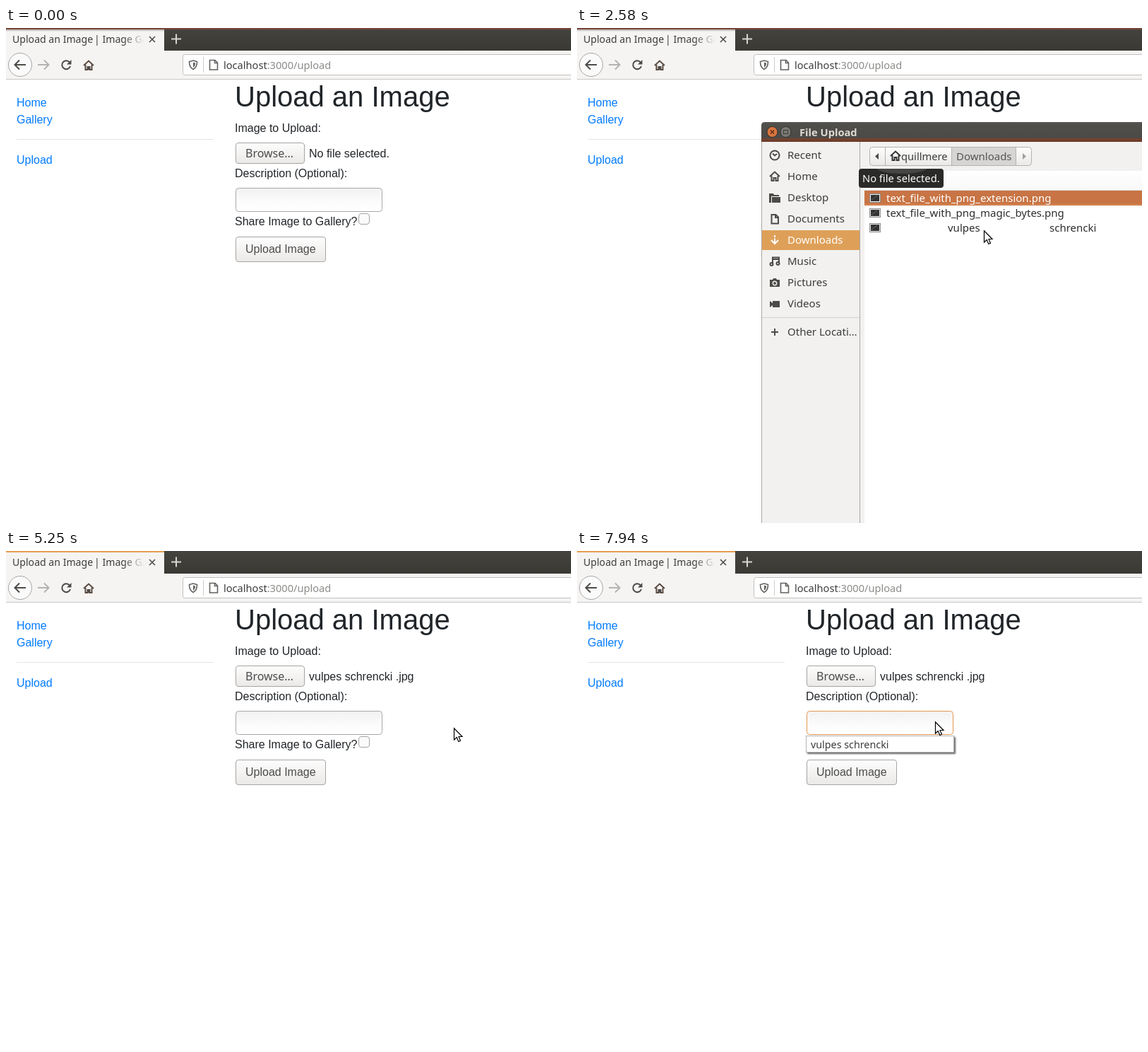
These frames come from a looping animation (800 px wide and 700 px high, 7.99 s). An HTML page:

```html
<!DOCTYPE html>
<html lang="en">
<head>
<meta charset="utf-8">
<title>Upload an Image</title>
<style>
  html, body { margin: 0; width: 100%; height: 100%; overflow: hidden; background: #fff; }
  svg { display: block; width: 800px; height: 700px; }
  text { white-space: pre; }
  .page { font: 16px "Liberation Sans", Arial, sans-serif; fill: #212529; }
  .ui { font: 15px "Noto Sans", "Open Sans", sans-serif; fill: #3c3c3c; }
  .link { fill: #007bff; }
  .icon { fill: none; stroke: #4c4b48; stroke-width: 2; }
  .solid { fill: #4c4b48; }
</style>
</head>
<body>
<svg viewBox="0 0 800 700" xmlns="http://www.w3.org/2000/svg">
  <defs>
    <linearGradient id="bar" x2="0" y2="1"><stop stop-color="#45433f"/><stop offset="1" stop-color="#3b3934"/></linearGradient>
    <linearGradient id="shade" x2="0" y2="1"><stop stop-color="#824633"/><stop offset=".3" stop-color="#74493c"/><stop offset=".45" stop-color="#55504c" stop-opacity=".4"/><stop offset="1" stop-color="#3b3934" stop-opacity="0"/></linearGradient>
    <linearGradient id="fade"><stop stop-color="#f5f4f2" stop-opacity="0"/><stop offset="1" stop-color="#f5f4f2"/></linearGradient>
    <linearGradient id="button" x2="0" y2="1"><stop stop-color="#fdfdfd"/><stop offset="1" stop-color="#ebe9e7"/></linearGradient>
    <linearGradient id="hover" x2="0" y2="1"><stop stop-color="#fff"/><stop offset="1" stop-color="#f0eeed"/></linearGradient>
    <linearGradient id="pressed" x2="0" y2="1"><stop stop-color="#d9d7d5"/><stop offset="1" stop-color="#e9e7e5"/></linearGradient>
    <linearGradient id="field" x2="0" y2="1"><stop stop-color="#f2f1f1"/><stop offset=".6" stop-color="#fcfcfc"/><stop offset="1" stop-color="#fff"/></linearGradient>
    <linearGradient id="header" x2="0" y2="1"><stop stop-color="#fff"/><stop offset="1" stop-color="#f8f8f8"/></linearGradient>
    <linearGradient id="title" x2="0" y2="1"><stop stop-color="#5a5856"/><stop offset=".1" stop-color="#504f4c"/><stop offset=".78" stop-color="#4b4a47"/><stop offset=".86" stop-color="#76432f"/><stop offset="1" stop-color="#673a29"/></linearGradient>
    <path id="house" d="M-7 0 0-6.5 7 0M-4.5-1V6H-1.5V2H1.5V6H4.5V-1"/>
  </defs>

  <!-- Browser frame -->
  <rect width="800" height="32" fill="url(#bar)"/>
  <rect width="224" height="32" fill="#f5f4f2"/>
  <rect y="32" width="800" height="40" fill="#f5f4f2"/>
  <path d="M0 72.5H800" stroke="#cac8c6"/>
  <rect id="tabLine" width="224" height="2" fill="#e79d51"/>
  <rect id="dimLine" width="800" height="5" fill="url(#shade)"/>
  <g class="ui">
    <text x="9" y="21" font-size="14.1" style="font-size:14.1px">Upload an Image</text>
    <text x="125" y="21" style="font-size:14.1px">| Image Ga</text>
    <rect x="166" y="5" width="30" height="24" fill="url(#fade)"/>
    <rect x="196" y="5" width="26" height="24" fill="#f5f4f2"/>
  </g>
  <path class="icon" d="M203 12l8 8M211 12l-8 8" style="stroke-width:1.6"/>
  <path d="M234 15.5H248M241 8.5V22.5" stroke="#d8d6d2" stroke-width="2"/>
  <circle cx="20" cy="52" r="16.5" fill="#fbfafa" stroke="#a8a6a4"/>
  <path class="icon" d="M28 52H13M19 45.5 12.5 52 19 58.5"/>
  <path class="icon" d="M45 52H60M54 45.5 60.5 52 54 58.5" style="stroke:#b5b3b1"/>
  <path class="icon" d="M90 48.5A6 6 0 1 0 91 54"/>
  <path class="solid" d="M92.500 45V51.500H86Z"/>
  <g transform="translate(117 53)"><use href="#house" class="icon" style="stroke:#5a4b42"/><path class="solid" d="M-1.500 1H1.500V6H-1.500Z"/></g>
  <rect x="250.500" y="37.500" width="560" height="29" rx="3" fill="#fff" stroke="#c3c1bf"/>
  <path class="icon" d="M265 46 270.500 47.500C270.500 53 269 56.500 265 58.500 261 56.500 259.500 53 259.500 47.500Z" style="stroke:#63625f;stroke-width:1.600"/>
  <path d="M265 48.500V56C267.500 54 268 52 268 49.500Z" fill="#63625f"/>
  <path d="M279.500 41V63" stroke="#cfcdcb"/>
  <path class="icon" d="M288.500 45.500H296L299.500 49V59H288.500ZM295.500 45.500V49.500H299.500" style="stroke:#63625f;stroke-width:1.600"/>
  <g class="ui">
    <text x="308" y="58" style="font-size:14.600px">localhost<tspan fill="#8c8b89">:3000/upload</tspan></text>
  </g>

  <!-- Page -->
  <g class="page">
    <text class="link" x="15" y="111">Home</text>
    <text class="link" x="15" y="135">Gallery</text>
    <path d="M15 157.500H294" stroke="#e5e5e5"/>
    <text class="link" x="15" y="192">Upload</text>
    <text x="324" y="111" style="font-size:40px">Upload an Image</text>
    <text x="324" y="147">Image to Upload:</text>
    <rect id="browse" x="325.500" y="162.500" width="97" height="29" rx="3.500"/>
    <text class="ui" x="339" y="183" style="font-size:16px;fill:#4c4c4c">Browse…</text>
    <text id="fileName" x="429" y="183"></text>
    <text x="324" y="211">Description (Optional):</text>
    <rect id="input" x="325.500" y="226.500" width="207" height="33" rx="4" fill="url(#field)"/>
    <rect id="caret" y="235" width="1" height="17" fill="#222"/>
    <text x="324" y="279">Share Image to Gallery?</text>
    <rect x="499.500" y="262.500" width="15" height="15" rx="3.500" fill="#fafafa" stroke="#a5a3a1"/>
    <rect x="325.500" y="295.500" width="127" height="35" rx="3.500" fill="url(#button)" stroke="#a7a5a2"/>
    <text x="339" y="318" style="fill:#4c4c4c">Upload Image</text>
  </g>

  <g id="suggest" style="filter:drop-shadow(2px 2px 1px #0009)">
    <rect x="324.500" y="261.500" width="209" height="23" fill="#fff" stroke="#b5b3b1"/>
    <rect id="suggestRow" x="326" y="262" width="206" height="22" fill="#c87444"/>
    <text id="suggestText" class="ui" x="331" y="279" style="font-size:14.300px">vulpes schrencki</text>
  </g>

  <!-- File chooser -->
  <g id="dialog">
    <path d="M261 700V138Q261 133 266 133H800V700Z" fill="#f2f1f0"/>
    <path d="M261 161V138Q261 133 266 133H800V161Z" fill="url(#title)"/>
    <path d="M261.500 161V700M400.500 161V700" stroke="#aaa8a5"/>
    <circle cx="276.500" cy="147" r="7.500" fill="#d9743f" stroke="#33312e"/>
    <path d="M274 144.500l5 5M279 144.500l-5 5" stroke="#5a2c17" stroke-width="1.300"/>
    <circle cx="295.500" cy="147" r="7.500" fill="#7b7974" stroke="#33312e"/>
    <rect x="292.500" y="144.500" width="6" height="5" fill="none" stroke="#3c3b37"/>
    <text class="ui" x="315" y="153" style="font-size:14.700px;font-weight:700;fill:#dfdbd2">File Upload</text>
    <rect x="262" y="286" width="138" height="28" fill="#dea058"/>
    <g id="places" class="ui"></g>
    <path d="M262 409.500H400" stroke="#d3d1cf"/>

    <rect x="414.500" y="168.500" width="229" height="26" rx="4" fill="url(#button)" stroke="#b5b3b0"/>
    <rect x="531" y="169" width="90" height="25" fill="#d7d5d3"/>
    <path d="M436.500 169V194M530.500 169V194M621.500 169V194" stroke="#b5b3b0"/>
    <path class="solid" d="M427 177V186L422 181.500Z"/>
    <path d="M631 177V186L636 181.500Z" fill="#a09e9b"/>
    <use href="#house" class="icon" x="451" y="181" style="stroke:#333"/>
    <text class="ui" x="459" y="187" style="font-size:14.700px">quillmere</text>
    <text class="ui" x="537" y="187" style="fill:#555">Downloads</text>

    <rect x="407" y="202" width="393" height="498" fill="#fff"/>
    <rect x="407" y="202" width="393" height="27" fill="url(#header)"/>
    <path d="M407 229.500H800" stroke="#dddbd9"/>
    <g id="files" class="ui"></g>
  </g>

  <g id="tooltip">
    <rect x="399" y="199" width="120" height="27" rx="4" fill="#2a2a29"/>
    <path d="M424 199H496Q486 206 460 206 434 206 424 199Z" fill="#454544"/>
    <text class="ui" x="404" y="218" style="font-size:14.700px;fill:#fff">No file selected.</text>
  </g>

  <path id="cursor" d="M.5.800V17L4.200 13.500 6.800 19.500 9.500 18.300 7 12.500H12Z" fill="#fff" stroke="#000" stroke-width="1.200"/>
</svg>

<script>
const LOOP = 7990;
const $ = id => document.getElementById(id);
const show = (id, on) => $(id).style.display = on ? "" : "none";
const within = (t, from, to) => t >= from && t < to;

// Sidebar entries: label, baseline, icon centred on (0,0)
const places = [
  ["Recent", 185, '<circle r="6.500"/><path d="M-3-2.500 0 .5 3-2"/>'],
  ["Home", 215, '<use href="#house"/>'],
  ["Desktop", 245, '<path class="solid" stroke="none" d="M-8-6H-2L-1-4H6V-2H-5V7H-8ZM-4-1H8V7H-4Z"/>'],
  ["Documents", 275, '<path d="M-4.500-6H1.500L5-2.500V6.500H-4.500ZM1-6V-2H5"/>'],
  ["Downloads", 305, '<path d="M0-7V-4M0-2.500V4M-5 0 0 5 5 0"/>'],
  ["Music", 335, '<path d="M-3 4V-5.500H6V3M-3-3H6"/><circle cx="-4.500" cy="4" r="2"/><circle cx="4.500" cy="3" r="2"/>'],
  ["Pictures", 365, '<path class="solid" stroke="none" d="M-7-4H-3L-2-6H2L3-4H7V6H-7Z"/><circle cy="1" r="2.700" stroke="#f2f1f0" stroke-width="1.500"/>'],
  ["Videos", 395, '<path class="solid" stroke="none" d="M-3-4H7V5H-3ZM-7-4-3-1V2L-7 5Z"/>'],
  ["Other Locati…", 435, '<path d="M-5 0H5M0-5V5"/>']
];
$("places").innerHTML = places.map(([label, y, icon]) => {
  const white = label === "Downloads" ? "#fff" : "";
  return `<g class="icon" transform="translate(280 ${y - 5})" style="stroke:${white}">${icon}</g>
    <text x="298" y="${y}" style="fill:${white}">${label}</text>`;
}).join("");

const files = [
  [[438, "text_file_with_png_extension.png"]],
  [[438, "text_file_with_png_magic_bytes.png"]],
  [[525, "vulpes"], [669, "schrencki"]]
];
$("files").innerHTML = files.map((words, i) => `<g transform="translate(0 ${230 + 21 * i})">
  <g class="mark"><rect x="407" width="393" height="21" fill="#c87444"/><path d="M407 19.500H800" stroke="#dc8c56"/></g>
  <rect x="414.500" y="4.500" width="15" height="12" fill="#eee" stroke="#888"/>
  <rect x="416" y="6" width="12" height="9" fill="#333"/><path d="M417 13 425 7" stroke="#666"/>
  ${words.map(([x, word]) => `<text x="${x}" y="16">${word}</text>`).join("")}</g>`).join("");
const rows = [...$("files").children];

// Pointer moves: start, end, steps, hidden from, way points
const moves = [
  [1200, 1560, 10, 1850, [[721, 274], [560, 200], [425, 170], [397, 175]]],
  [1850, 2240, 9, 2240, [[397, 175], [590, 230], [802, 300]]],
  [2380, 2580, 6, 3520, [[789, 319], [650, 296], [576, 286]]],
  [3520, 3660, 4, 3660, [[605, 297], [690, 332], [784, 368], [802, 376]]],
  [5090, 5670, 13, 7280, [[764, 294], [590, 235], [450, 207], [405, 251]]],
  [7280, 7940, 16, LOOP, [[407, 252], [440, 268], [480, 266], [507, 241]]]
];

function pointer(t) {
  const move = moves.find(m => within(t, m[0], m[3]));
  if (!move) return null;
  const [start, end, steps, , points] = move;
  const step = Math.floor((t - start) / (end - start) * (steps - 1) + 1e-6);
  const at = Math.min(1, step / (steps - 1)) * (points.length - 1);
  const i = Math.min(Math.floor(at), points.length - 2);
  return points[i].map((v, axis) => Math.round(v + (points[i + 1][axis] - v) * (at - i)));
}

// The description receives only spaces, so just the caret advances.
const spaces = [6220, 6380, 6590, 6720, 6850, 6940, 7100];
const SPACE = 4.445;

function draw(t) {
  const inactive = t < 920 || within(t, 1980, 4470);
  show("tabLine", !inactive);
  show("dimLine", inactive);

  const pressed = within(t, 1700, 1800);
  const hover = within(t, 1560, 1980) || within(t, 4430, 4940);
  $("browse").setAttribute("fill", `url(#${pressed ? "pressed" : hover ? "hover" : "button"})`);
  $("browse").setAttribute("stroke", pressed ? "#cf7f3c" : "#a7a5a2");
  $("fileName").textContent = t < 4430 ? "No file selected." : "vulpes schrencki .jpg";

  show("dialog", within(t, 2040, 4430));
  $("dialog").style.opacity = t < 2240 ? Math.floor((t - 2040) / 50 + 1) / 5 : 1;
  show("tooltip", within(t, 2000, 4590));
  const selected = t < 2830 ? 0 : 2;
  rows.forEach((row, i) => {
    row.firstElementChild.style.display = i === selected ? "" : "none";
    row.style.fill = i === selected ? "#fff" : "#2e2e2e";
  });

  $("input").setAttribute("stroke", t >= 5610 ? "#e2984f" : "#aaa8a6");
  show("caret", within(t, 5610, 5670) || within(t, 6170, 7600));
  $("caret").setAttribute("x", Math.floor(337.2 + SPACE * spaces.filter(s => t >= s).length));

  const tip = pointer(t);
  show("cursor", tip);
  if (tip) $("cursor").setAttribute("transform", `translate(${tip})`);

  show("suggest", t >= 6290);
  const over = tip !== null && tip[1] > 261;
  show("suggestRow", over);
  $("suggestText").style.fill = over ? "#fff" : "";
}

const origin = performance.now();
function frame() {
  draw((performance.now() - origin) % LOOP);
  requestAnimationFrame(frame);
}
frame();
</script>
</body>
</html>
```
